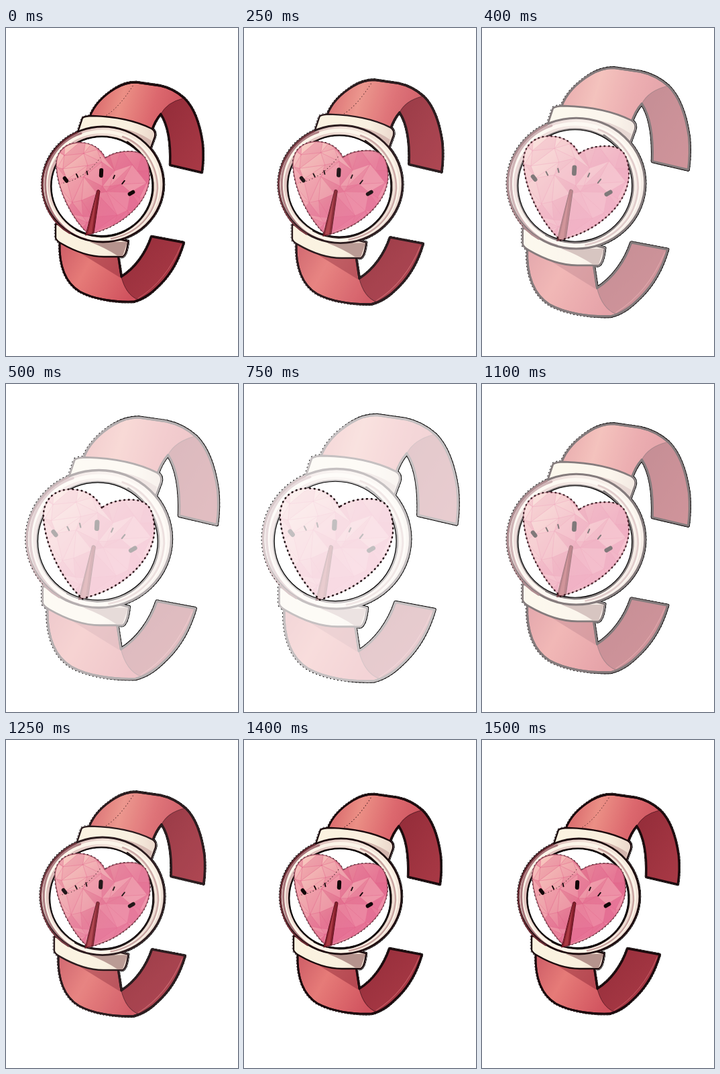
These frames come from a looping animation (346x489 px, 1.55 s). An HTML page:

```html
<!DOCTYPE html>
<html lang="en">
<head>
<meta charset="utf-8">
<title>Heart watch</title>
<style>
  html, body { margin: 0; width: 100%; height: 100%; overflow: hidden; background: #fff }
  svg { display: block; width: 100vw; height: 100vh }
</style>
</head>
<body>
<svg viewBox="0 0 346 489" stroke-linejoin="round" stroke-linecap="round">
  <defs>
    <linearGradient id="strapTop" gradientUnits="userSpaceOnUse" x1="130" y1="105" x2="262" y2="145">
      <stop stop-color="#d8686b"/><stop offset=".3" stop-color="#eb8f85"/>
      <stop offset=".65" stop-color="#dc686e"/><stop offset="1" stop-color="#cb525d"/>
    </linearGradient>
    <linearGradient id="strapLow" gradientUnits="userSpaceOnUse" x1="82" y1="340" x2="185" y2="400">
      <stop stop-color="#d2636a"/><stop offset=".35" stop-color="#e67b78"/><stop offset="1" stop-color="#d0525e"/>
    </linearGradient>
    <linearGradient id="inside" x1="0" y1="0" x2="1" y2="1">
      <stop stop-color="#932c39"/><stop offset="1" stop-color="#ad3c48"/>
    </linearGradient>
    <linearGradient id="cream" x1="0" x2="1">
      <stop stop-color="#fbf3e0"/><stop offset=".7" stop-color="#f9efde"/><stop offset="1" stop-color="#ead6ca"/>
    </linearGradient>
    <linearGradient id="metal" x1="0" y1=".2" x2="1" y2=".8">
      <stop stop-color="#c99a9c"/><stop offset=".3" stop-color="#efddd4"/>
      <stop offset=".7" stop-color="#f8ecdf"/><stop offset="1" stop-color="#e6d0c8"/>
    </linearGradient>
    <linearGradient id="gem" gradientUnits="userSpaceOnUse" x1="88" y1="178" x2="188" y2="280">
      <stop stop-color="#f7cfc0"/><stop offset=".35" stop-color="#eda3a9"/>
      <stop offset=".65" stop-color="#e67f99"/><stop offset="1" stop-color="#ea7da0"/>
    </linearGradient>
    <linearGradient id="rightOnly" gradientUnits="userSpaceOnUse" x1="150" y1="0" x2="175" y2="0">
      <stop stop-opacity="0"/><stop offset="1"/>
    </linearGradient>
    <path id="upper" d="M125 132C132 113 148 99 163 90C173 84 182 81 194 81L229 86C243 89 256 96 266 105C281 120 289 144 293 172Q295 194 292 215L245 204C246 176 244 148 231 128Q222 138 217 154Z"/>
    <path id="lower" d="M80 319C79 351 87 379 110 393C130 404 160 409 190 408C207 404 218 394 230 382C248 364 258 344 265 320L217 311C209 335 193 358 172 371L167 338Z"/>
    <path id="lugTop" d="M107 155L114 134Q118 131 129 131C164 132 195 139 217 150Q224 154 222 162L215 181Z"/>
    <path id="lugLow" d="M74 292L74 313Q75 317 82 321C101 332 122 341 146 341L174 341Q180 338 182 318Z"/>
    <ellipse id="rim" cx="144.5" cy="233" rx="90.5" ry="86"/>
    <path id="heart" d="M148 194C141 179 126 170 106 171C85 173 75 187 75 205C77 243 99 285 124 308L139 303C173 292 212 262 214 222C213 194 205 184 184 184Q162 184 148 194Z"/>
    <clipPath id="heartClip"><use href="#heart"/></clipPath>
    <clipPath id="lowerClip"><use href="#lower"/></clipPath>
    <clipPath id="upperClip"><use href="#upper"/></clipPath>
    <g id="body"><use href="#upper"/><use href="#lower"/><use href="#lugTop"/><use href="#lugLow"/><use href="#rim"/></g>
    <ellipse id="hole" cx="143" cy="236" rx="75" ry="73.5"/>
  </defs>

  <g id="watch">
    <!-- crisp edge that stays while the artwork fades -->
    <g stroke-linecap="butt">
      <use href="#body" stroke="#000" stroke-width="4.4" stroke-dasharray="1.5 3"/>
      <use href="#body" stroke="url(#rightOnly)" stroke-width="4.4"/>
      <use href="#body" fill="#fff" stroke="#fff" stroke-width="2.8"/>
    </g>

    <g id="art">
      <g stroke="#1b090c" stroke-width="2.8">
        <use href="#upper" fill="url(#strapTop)"/>
        <use href="#lower" fill="url(#strapLow)"/>
      </g>
      <g clip-path="url(#upperClip)">
        <path fill="url(#inside)" stroke="#65202a" d="M231 128Q240 111 264 105L310 130V230H240Z"/>
      </g>
      <g clip-path="url(#lowerClip)">
        <path fill="#932c3b" d="M110 335L170 372L167 335Z" opacity=".5"/>
        <path fill="url(#inside)" stroke="#65202a" d="M172 371C176 387 184 400 197 405L232 384L275 315L217 305Z"/>
        <path fill="none" stroke="#c95f67" d="M197 403Q239 377 261 324"/>
      </g>
      <g fill="none" stroke="#1b090c" stroke-width="2.8"><use href="#upper"/><use href="#lower"/></g>
      <g fill="url(#cream)" stroke="#1b090c" stroke-width="2.4"><use href="#lugTop"/><use href="#lugLow"/></g>
      <path fill="#b5938d" d="M125 319Q147 327 167 340L174 340L181 319Z"/>
      <path fill="#d3b5ad" d="M157 148Q190 156 215 177L217 168Q189 149 157 148Z"/>

      <use href="#rim" fill="url(#metal)"/>
      <g fill="none">
        <ellipse cx="143.5" cy="234.5" rx="84" ry="80" stroke="#fcf5e9" stroke-width="5"/>
        <path stroke="#a8757a" stroke-width="3" d="M112 157C76 169 56 203 59 241C62 278 88 307 119 315"/>
        <path stroke="#c9a3a0" stroke-width="2.5" d="M174 162C205 173 226 205 226 239C223 280 194 307 157 314"/>
        <use href="#rim" stroke="#1b090c" stroke-width="2.8"/>
        <path stroke="#6a2b33" stroke-width="2.4" d="M106 156C73 171 54 203 54 235C55 266 70 292 95 306"/>
        <use href="#hole" stroke="#170a0b" stroke-width="4"/>
        <path stroke="#170a0b" stroke-width="3" d="M181 170C205 186 221 210 219 242C215 281 182 311 142 311Q121 310 105 301"/>
      </g>
    </g>

    <use href="#hole" fill="#fff" stroke="#000"/>
    <use href="#heart" fill="#fff" stroke="#000" stroke-width="2.2" stroke-dasharray=".6 5"/>
    <g id="dial">
      <use href="#heart" fill="url(#gem)"/>
      <g id="facets" clip-path="url(#heartClip)"/>
      <use href="#heart" fill="none" stroke="#a04c60" stroke-width="1.3"/>
      <path fill="#861f2c" stroke="#5d1520" d="M136 242Q138 240 140 243L131 305L119 309Z"/>
      <path fill="#aa3943" d="M136 245L128 306L122 307Z"/>
      <g id="ticks" stroke="#120608"/>
    </g>
    <g id="glints" fill="none" stroke="#2a1114" stroke-dasharray=".5 4">
      <path d="M150 130Q169 118 190 85"/>
      <path d="M86 231Q118 224 141 193"/>
    </g>
  </g>
</svg>
<script>
const $ = id => document.getElementById(id);

// Cut the gem into triangles over a jittered grid.
let seed = 11;
const random = () => (seed = seed * 16807 % 2147483647) / 2147483647;
const columns = 7, rows = 7, points = [];
for (let r = 0; r <= rows; r++)
  for (let c = 0; c <= columns; c++)
    points.push([70 + c * 22 + (random() - .5) * 17, 164 + r * 22 + (random() - .5) * 17].map(Math.round));

const tones = ['#d94a78', '#f5b0b8', '#e2658c', '#ee8fa4', '#f2a8b0'];
let facets = '';
const facet = (...corners) => {
  const tone = tones[Math.floor(random() * tones.length)];
  facets += `<path d="M${corners.map(i => points[i]).join('L')}Z" fill="${tone}"
    fill-opacity="${.15 + random() * .4}" stroke="#e0668a" stroke-opacity=".45" stroke-width=".6"/>`;
};
for (let r = 0; r < rows; r++)
  for (let c = 0; c < columns; c++) {
    const a = r * (columns + 1) + c, b = a + 1, d = a + columns + 1, e = d + 1;
    if (random() < .5) { facet(a, b, d); facet(b, e, d); }
    else { facet(a, b, e); facet(a, e, d); }
  }
$('facets').innerHTML = facets;

// x, y, tilt, length, thickness
$('ticks').innerHTML = [
  [89, 226, -38, 5, 5.5], [106, 220, -27, 5, 1.8], [121, 216, -14, 5, 1.8],
  [142, 216, 3, 8, 6], [161, 222, 24, 5, 1.8], [175, 230, 38, 6, 1.8], [187, 246, 60, 6, 5.5]
].map(([x, y, tilt, length, width]) =>
  `<path transform="translate(${x} ${y}) rotate(${tilt})" d="M0 ${-length / 2}V${length / 2}" stroke-width="${width}"/>`
).join('');

const period = 1550, half = 750;
const easeInOut = t => t < .5 ? 8 * t ** 4 : 1 - 8 * (1 - t) ** 4;

function draw(now) {
  const time = Math.floor(now % period / 50) * 50;
  const pulse = easeInOut(1 - Math.abs(time - half) / half);
  $('watch').setAttribute('transform',
    `translate(175 243.5) scale(${1 + .213 * pulse}) translate(-175 -243.5)`);
  for (const id of ['art', 'dial']) $(id).setAttribute('opacity', 1 - .75 * pulse);
  $('glints').setAttribute('opacity', Math.max(0, 1 - 2 * pulse));
  requestAnimationFrame(draw);
}
draw(0);
</script>
</body>
</html>
```
